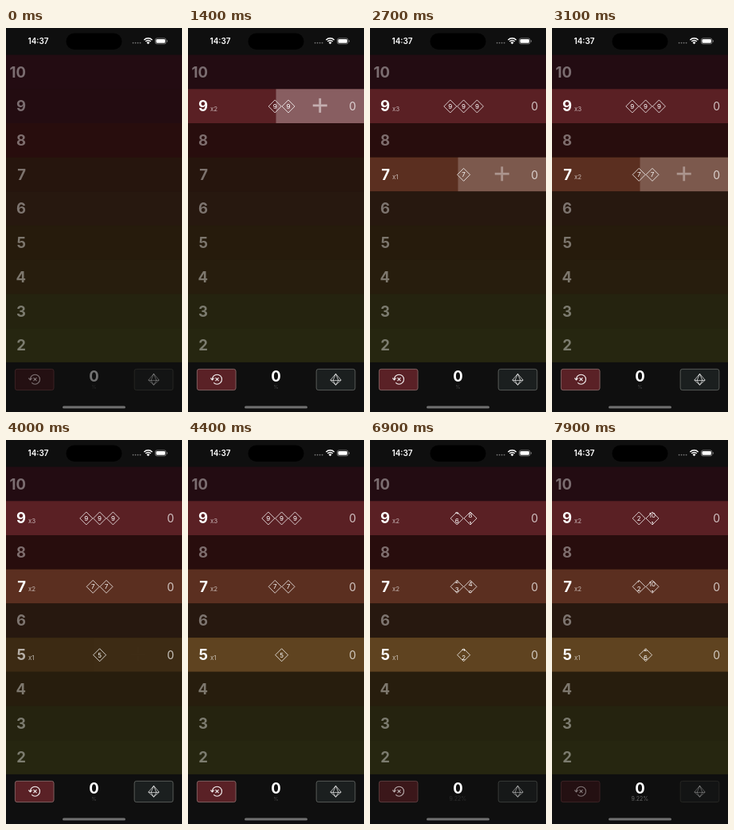
Write an HTML page with a canvas that moves like this. It is 221 px wide and 480 px high and loops after 8 s.

```html
<!DOCTYPE html>
<html lang="en">
<head>
<meta charset="utf-8">
<title>Dice picker</title>
<style>
html, body { margin: 0; width: 100%; height: 100%; overflow: hidden; background: #0f0f0f; }
canvas { display: block; width: 221px; height: 480px; }
</style>
</head>
<body>
<canvas id="stage"></canvas>
<script>
const W = 221, H = 480, LOOP = 8000;
const TOP = 33.6, ROW = 42.7, MID = 117.6, GAP = 16.8, STEP = 11;
const ROLL = 6800, ROLL_TIME = 1100, FLASH = 400;
const FONT = 'Inter, "Open Sans", sans-serif';

const canvas = document.getElementById('stage');
const ctx = canvas.getContext('2d');
const dpr = window.devicePixelRatio || 1;
canvas.width = Math.round(W * dpr);
canvas.height = Math.round(H * dpr);

// Rows from 10 down to 2; a lit colour marks the rows that get dice.
const rows = [
  { sides: 10, dim: '#230c12' },
  { sides: 9, dim: '#230c11', lit: '#5a2024', rest: [[2, 0], [10, -4]] },
  { sides: 8, dim: '#280d0d' },
  { sides: 7, dim: '#26150d', lit: '#5b2f20', rest: [[2, 2.5], [10, -3]] },
  { sides: 6, dim: '#27180f' },
  { sides: 5, dim: '#261b0c', lit: '#5f4320', rest: [[6, 3]] },
  { sides: 4, dim: '#271d0d' },
  { sides: 3, dim: '#25230f' },
  { sides: 2, dim: '#262610' }
];
const taps = [
  [1000, 9, 1], [1200, 9, 1], [1800, 9, 1],
  [2600, 7, 1], [3000, 7, 1], [4000, 5, 1], [5200, 9, -1]
];

const clamp = v => Math.max(0, Math.min(1, v));
const ramp = (t, start, time) => clamp((t - start) / time);
const white = a => `rgba(255,255,255,${a})`;

function text(str, x, y, size, weight, color, align = 'center') {
  ctx.font = `${weight} ${size}px ${FONT}`;
  ctx.textAlign = align;
  ctx.textBaseline = 'alphabetic';
  ctx.fillStyle = color;
  ctx.fillText(str, x, y + size * 0.364);
}

function box(x, y, w, h, r, fill, stroke) {
  ctx.beginPath();
  ctx.roundRect(x, y, w, h, r);
  if (fill) { ctx.fillStyle = fill; ctx.fill(); }
  if (stroke) { ctx.strokeStyle = stroke; ctx.lineWidth = 0.8; ctx.stroke(); }
}

function line(points, closed) {
  ctx.beginPath();
  points.forEach(([x, y]) => ctx.lineTo(x, y));
  if (closed) ctx.closePath();
  ctx.stroke();
}

function statusBar() {
  text('14:37', 40.5, 16.5, 10, 600, '#fff');
  box(75.5, 6.5, 70, 20.5, 10.25, '#000');
  for (let i = 0; i < 4; i++) box(158.7 + i * 3, 17.7, 1.8, 1.8, 0.9, '#777');
  ctx.strokeStyle = '#fff';
  ctx.lineWidth = 1.5;
  for (const r of [7.2, 4.6]) {
    ctx.beginPath();
    ctx.arc(178.5, 20, r, -Math.PI * 0.75, -Math.PI * 0.25);
    ctx.stroke();
  }
  ctx.beginPath();
  ctx.moveTo(178.5, 20.2);
  ctx.arc(178.5, 20.2, 2.8, -Math.PI * 0.75, -Math.PI * 0.25);
  ctx.fillStyle = '#fff';
  ctx.fill();
  box(187.4, 12.9, 13.6, 7, 2.2, null, '#888');
  box(188.5, 14, 11.4, 4.8, 1.3, '#fff');
  box(201.8, 15.2, 1, 2.4, 0.5, '#888');
}

// Strip value: starts at the die's own number and stops at its resting one.
function face(k, last, sides, end, seed) {
  if (k === 0) return sides;
  if (k === last) return end;
  if (k === last + 1) return 1;
  return 1 + Math.floor(Math.abs(Math.sin(k * 12.9 + seed * 7.3) * 43758.5)) % sides;
}

function die(x, y, row, i, t) {
  ctx.strokeStyle = white(0.85);
  ctx.lineWidth = 0.9;
  line([[x, y - 8], [x + 8, y], [x, y + 8], [x - 8, y]], true);
  if (t < ROLL) return text(row.sides, x, y, 8, 400, '#fff');

  const [end, offset] = row.rest[i] || row.rest[0];
  const last = 7 + i * 2;
  const ease = 1 - Math.pow(1 - ramp(t, ROLL, ROLL_TIME), 3);
  const shift = (last * STEP - offset) * ease;
  const near = Math.round(shift / STEP);
  ctx.save();
  ctx.beginPath();
  ctx.rect(x - 8, y - 7.5, 16, 15);
  ctx.clip();
  for (let k = Math.max(0, near - 1); k <= near + 1; k++) {
    text(face(k, last, row.sides, end, row.sides + i), x, y + k * STEP - shift, 8, 400, '#fff');
  }
  ctx.restore();
}

function flash(y, dir, env) {
  const left = dir < 0 ? 0 : W / 2;
  const x = left + W / 4, cy = y + ROW / 2;
  ctx.fillStyle = white(0.28 * env);
  ctx.fillRect(left, y, W / 2, ROW);
  ctx.fillStyle = white(0.5 * env);
  ctx.fillRect(x - 9, cy - 2.2, 18, 2.8);
  if (dir > 0) {
    ctx.fillRect(x - 1.4, cy - 9.8, 2.8, 7.6);
    ctx.fillRect(x - 1.4, cy + 0.6, 2.8, 7.6);
  }
}

function drawRow(row, index, t) {
  const y = TOP + index * ROW, cy = y + ROW / 2;
  const mine = taps.filter(([at, sides]) => sides === row.sides && at <= t);
  const count = mine.reduce((sum, tap) => sum + tap[2], 0);
  ctx.fillStyle = row.dim;
  ctx.fillRect(0, y, W, ROW + 0.5);
  if (!count) return text(row.sides, 25, cy, 18.5, 700, white(0.4), 'right');

  const on = ramp(t, mine[0][0] - 60, 160);
  ctx.globalAlpha = on;
  ctx.fillStyle = row.lit;
  ctx.fillRect(0, y, W, ROW);
  ctx.globalAlpha = 1;

  const [at, , dir] = mine[mine.length - 1];
  if (t < at + FLASH) flash(y, dir, Math.sin(Math.PI * (t - at) / FLASH));

  text(row.sides, 25, cy, 18.5, 700, white(0.4 + 0.6 * on), 'right');
  text('x' + count, 28, cy + 3.3, 8, 400, white(0.65), 'left');
  for (let i = 0; i < count; i++) {
    die(MID + (i - (count - 1) / 2) * GAP, cy + 0.3, row, i, t);
  }
  text('0', 211, cy + 0.5, 14, 400, white(0.72), 'right');
}

function resetIcon(x, y) {
  ctx.lineWidth = 1.1;
  ctx.beginPath();
  ctx.arc(x, y, 6, -Math.PI, Math.PI * 0.75);
  ctx.stroke();
  line([[x - 8.2, y - 1.6], [x - 6, y + 0.8], [x - 3.8, y - 1.6]]);
  line([[x - 2, y - 2], [x + 2, y + 2]]);
  line([[x + 2, y - 2], [x - 2, y + 2]]);
}

function rollIcon(x, y) {
  ctx.lineWidth = 0.8;
  line([[x, y - 7], [x + 6.7, y + 1], [x, y + 7], [x - 6.7, y + 1]], true);
  line([[x, y - 7], [x - 3.4, y + 1.4], [x, y + 7], [x + 3.4, y + 1.4]], true);
  line([[x - 6.7, y + 1], [x - 3.4, y + 1.4], [x + 3.4, y + 1.4], [x + 6.7, y + 1]]);
}

function footer(t) {
  const lit = ramp(t, 960, 200) * (1 - ramp(t, ROLL - 40, 250));
  const total = ramp(t, 960, 200);
  const rolled = ramp(t, ROLL, 300);

  box(11.4, 426.4, 48.6, 26.2, 2.5, '#241012', '#45282a');
  box(161.2, 426.4, 48.6, 26.2, 2.5, '#131414', '#2b2b28');
  ctx.globalAlpha = lit;
  box(11.4, 426.4, 48.6, 26.2, 2.5, '#5a2126', '#8a6d6b');
  box(161.2, 426.4, 48.6, 26.2, 2.5, '#1b1f1f', '#616562');
  ctx.globalAlpha = 1;

  ctx.strokeStyle = white(0.42 + 0.53 * lit);
  resetIcon(36.5, 439.2);
  ctx.strokeStyle = white(0.36 + 0.49 * lit);
  rollIcon(185.5, 439.2);

  text('0', 110.4, 435, 18.5, 700, white(0.42 + 0.58 * total));
  if (t < ROLL) text('%', 110.4, 448.3, 6.5, 400, white(0.1 + 0.12 * total));
  else text('9.22%', 110.4, 448.3, 7, 400, white(0.36 * rolled));
  box(71, 472.4, 79, 3, 1.5, '#707070');
}

function draw() {
  const t = performance.now() % LOOP;
  ctx.setTransform(dpr, 0, 0, dpr, 0, 0);
  ctx.fillStyle = '#0f0f0f';
  ctx.fillRect(0, 0, W, H);
  rows.forEach((row, i) => drawRow(row, i, t));
  ctx.fillStyle = '#0f0f0f';
  ctx.fillRect(0, TOP + rows.length * ROW, W, H);
  statusBar();
  footer(t);
  requestAnimationFrame(draw);
}
draw();
</script>
</body>
</html>
```
